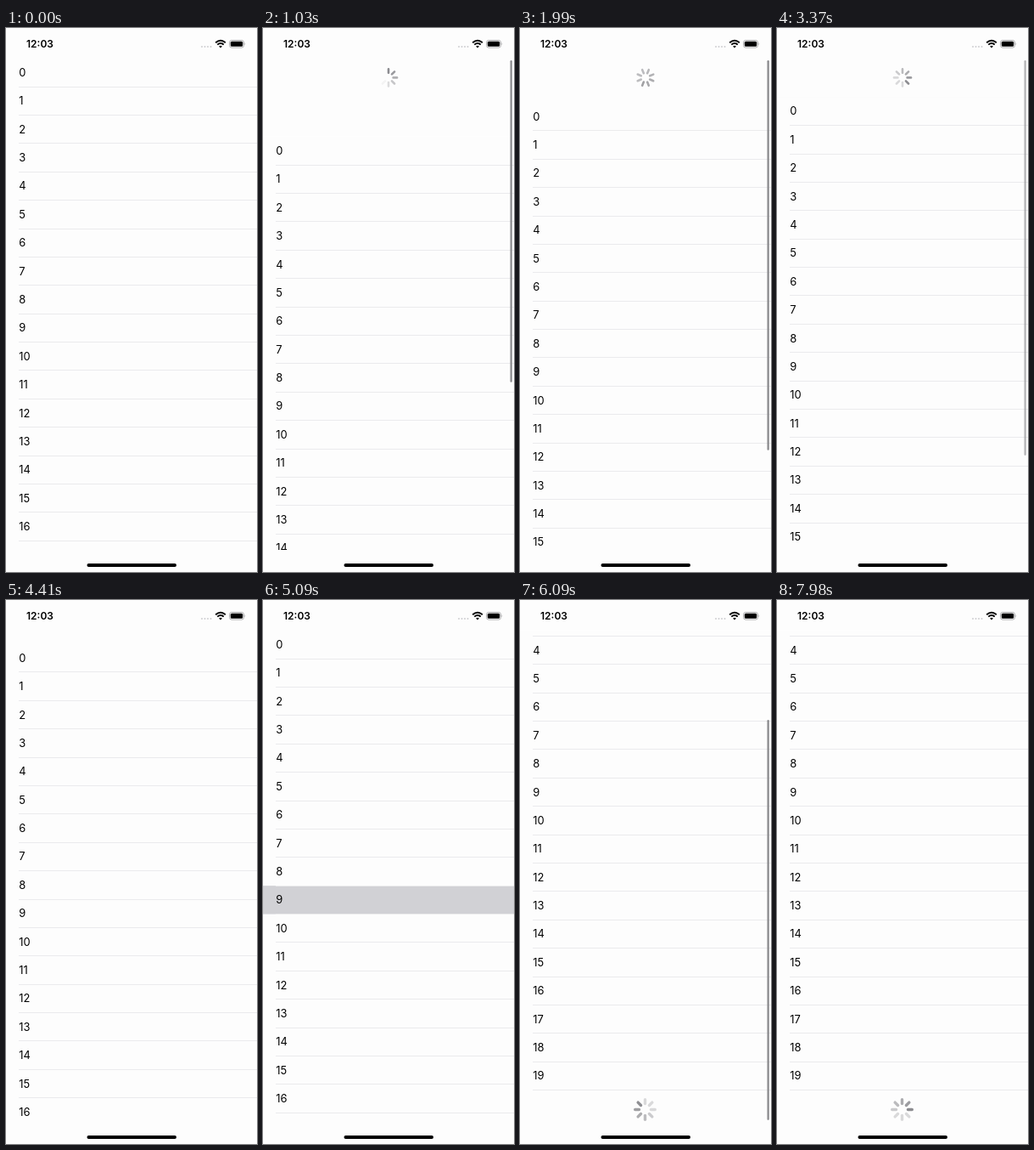
Recreate the animation shown at these times as an HTML page. Size 296x640 px, loop 8000 ms.

```html
<!DOCTYPE html>
<html lang="en">
<head>
<meta charset="utf-8">
<title>Pull to refresh list</title>
<style>
  html, body { margin: 0; width: 100%; height: 100%; overflow: hidden; background: #fdfdfd; }
  svg { display: block; width: 100vw; height: 100vh; }
  text { font-family: Inter, Roboto, sans-serif; fill: #000; }
</style>
</head>
<body>
<svg viewBox="0 0 296 640" preserveAspectRatio="none">
  <defs>
    <clipPath id="view"><rect y="35.7" width="296" height="578.3"/></clipPath>
  </defs>
  <rect width="296" height="640" fill="#fdfdfd"/>
  <g clip-path="url(#view)">
    <g id="refresh"></g>
    <g id="list"></g>
    <rect id="bar" x="291.5" width="2.3" rx="1.15" fill="#8c8c8f"/>
  </g>

  <text x="24" y="23" font-size="12" font-weight="600">12:03</text>
  <g fill="#cfcfd2">
    <circle cx="231" cy="22" r="1"/><circle cx="234.5" cy="22" r="1"/>
    <circle cx="238" cy="22" r="1"/><circle cx="241.5" cy="22" r="1"/>
  </g>
  <g fill="none" stroke="#000" stroke-width="1.9">
    <path d="M247.2 17.3Q253 12.1 258.8 17.3"/>
    <path d="M249.3 19.6Q253 16.4 256.7 19.6"/>
  </g>
  <path d="M251.1 21.4Q253 19.9 254.9 21.4L253 23.4Z"/>
  <rect x="263.5" y="14.5" width="17" height="8.6" rx="2.6" fill="none" stroke="#a8a8aa" stroke-width=".9"/>
  <rect x="264.8" y="15.8" width="14.4" height="6" rx="1.5"/>
  <path d="M281.6 17.3q1.5 1.5 0 3z" fill="#a8a8aa"/>
  <rect x="95.5" y="630" width="105.5" height="4" rx="2"/>
</svg>
<script>
const NS = 'http://www.w3.org/2000/svg';
const LOOP = 8000, TOP = 35.7, ROW = 33.385, ROWS = 20;
const INSET = 45.6, END = 126.8;
const byId = id => document.getElementById(id);
const clamp = (v, lo = 0, hi = 1) => Math.min(hi, Math.max(lo, v));
const part = (t, from, to) => clamp((t - from) / (to - from));
const ease = p => (1 - Math.cos(Math.PI * p)) / 2;

function add(parent, tag, attrs) {
  const el = document.createElementNS(NS, tag);
  for (const key in attrs) el.setAttribute(key, attrs[key]);
  return parent.appendChild(el);
}

function makeSpinner(parent, inner, outer, width) {
  return Array.from({ length: 8 }, (_, i) => add(parent, 'line', {
    y1: -inner, y2: -outer, transform: `rotate(${i * 45})`,
    stroke: '#3c3c43', 'stroke-width': width, 'stroke-linecap': 'round'
  }));
}

const list = byId('list'), refresh = byId('refresh'), bar = byId('bar');

add(list, 'rect', { y: TOP, width: 296, height: ROW * ROWS + 80, fill: '#fdfdfd' });
const highlight = add(list, 'rect', {
  y: TOP + 9 * ROW, width: 296, height: ROW, fill: '#d1d1d5'
});
for (let i = 0; i < ROWS; i++) {
  const y = TOP + i * ROW;
  add(list, 'text', { x: 15.2, y: y + 21.2, 'font-size': 12.9 }).textContent = i;
  add(list, 'rect', {
    x: 15.2, y: y + ROW - .5, width: 281, height: 1,
    fill: '#ebebed', 'shape-rendering': 'crispEdges'
  });
}
const footer = add(list, 'g', { transform: `translate(147.5 ${599.5 + END})` });
const footSpokes = makeSpinner(footer, 7, 11.8, 3.4);
const pullSpokes = makeSpinner(refresh, 5.6, 10, 2.6);

// Downward pull, spring to the refresh inset, then the return to rest
function pullAt(t) {
  if (t < 1400) return 122 * ease(part(t, 500, 1292));
  const u = 7.03 * (t - 1400) / 1000;
  const held = INSET + (122 - INSET) * (1 + u) * Math.exp(-u);
  return held * (1 - ease(part(t, 4040, 4660)));
}

// Flick to the end of the list with a short bounce
function scrollAt(t) {
  if (t < 5420) return END * Math.pow(part(t, 5150, 5420), 1.2);
  const u = 12 * (t - 5420) / 1000;
  return END + (t < 6000 ? 14 * u * Math.exp(1 - u) : 0);
}

// even = 1 lights all spokes alike, even = 0 gives the full trailing tail
function spin(spokes, head, even = 0) {
  spokes.forEach((spoke, i) => {
    const lag = (((head - i) % 8) + 8) % 8;
    const glow = lag > 7.3 ? (lag - 7.3) / .7 : clamp(1 - lag / 5);
    spoke.setAttribute('opacity', .18 + .4 * (glow + (.6 - glow) * even));
  });
}

function drawBar(t, pull, scroll) {
  let opacity = 0, y = 38, length = 471;
  if (t < 5000) {
    const loading = t >= 1400;
    opacity = t > 500 ? 1 - part(t, 3300, 3500) : 0;
    length = loading ? 465 - Math.max(0, pull - INSET) : 471 - pull;
  } else {
    opacity = t > 5150 ? 1 - part(t, 6200, 6500) : 0;
    length -= Math.max(0, scroll - END);
    y = scroll > END ? 612 - length : 38 + 103 * scroll / END;
  }
  bar.setAttribute('y', y);
  bar.setAttribute('height', length);
  bar.setAttribute('opacity', opacity);
}

function drawRefresh(t, pull) {
  const size = 1 - part(t, 4040, 4360);
  // The full ring makes a slowing half turn once the refresh starts
  const left = t < 1292 ? 0 : (1 - part(t, 1292, 2372)) ** 2;
  refresh.setAttribute('transform',
    `translate(148 58.4) scale(${size}) rotate(${-180 * left})`);
  refresh.setAttribute('opacity', size);
  if (t < 1292) {
    const shown = (pull - 45) / 47 * 5;
    pullSpokes.forEach((spoke, i) =>
      spoke.setAttribute('opacity', .58 * clamp((shown - i + .4) / 5)));
  } else {
    spin(pullSpokes, 3 + (t - 3370) / 100, clamp(left * 5));
  }
}

function draw(t) {
  const pull = pullAt(t), scroll = scrollAt(t);
  list.setAttribute('transform', `translate(0 ${pull - scroll})`);
  highlight.setAttribute('visibility', t >= 5090 && t < 5180 ? 'visible' : 'hidden');
  drawRefresh(t, pull);
  spin(footSpokes, 2 + (t - 7980) / 100);
  drawBar(t, pull, scroll);
}

const start = performance.now();
function tick() {
  draw((performance.now() - start) % LOOP);
  requestAnimationFrame(tick);
}
tick();
</script>
</body>
</html>
```
